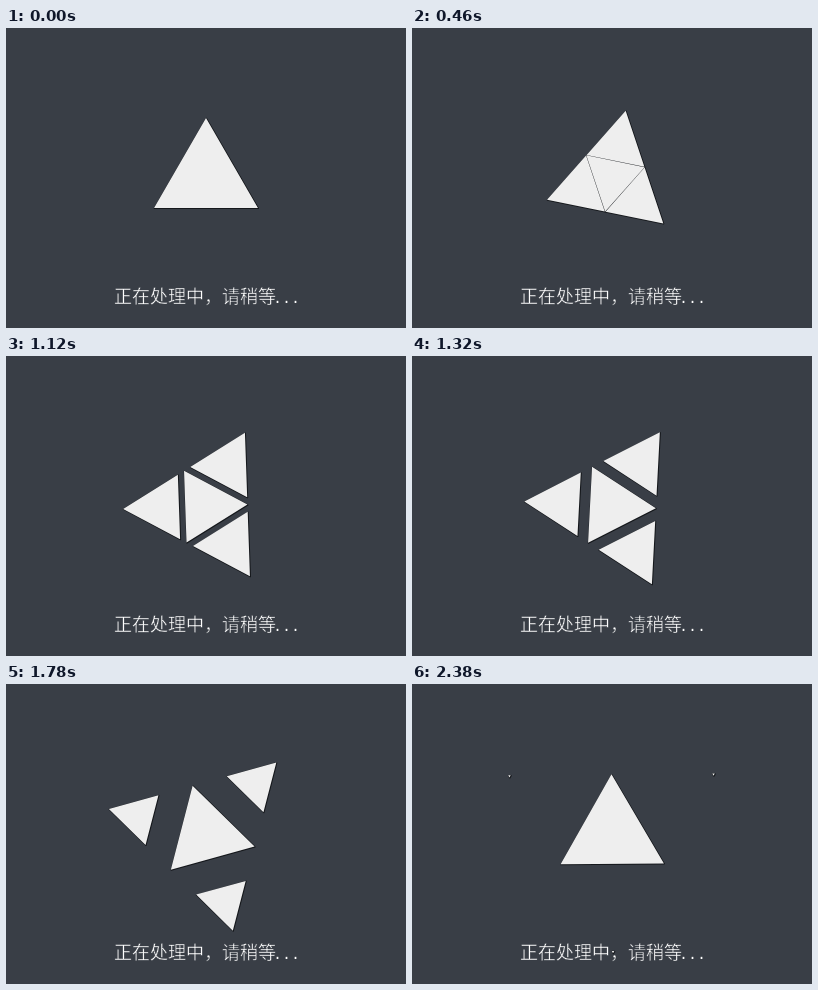
Write an HTML page that moves like this. It is 400 by 300 pixels and loops after 2.4 s.

```html
<!DOCTYPE html>
<html lang="zh-CN">
<head>
<meta charset="utf-8">
<style>
  html, body { margin: 0; width: 100%; height: 100%; overflow: hidden; background: #393e46; }
  svg { display: block; width: 400px; height: 300px; }
  #shape { fill: #eee; }
  #shade { fill: #0d0f12; stroke: #0d0f12; stroke-width: 1.3; stroke-linejoin: round; opacity: .8; }
  text { fill: #fff; stroke: #393e46; stroke-width: .35; font: 18px "Noto Sans CJK SC", "Noto Sans CJK", sans-serif; }
  .dots { stroke: none; font: 15px "Liberation Mono", monospace; }
</style>
</head>
<body>
<svg viewBox="0 0 400 300">
  <path id="shade" transform="translate(.4 .4)"/>
  <path id="shape"/>
  <text x="108" y="275">正在处理中，请稍等<tspan class="dots" x="267">...</tspan></text>
</svg>
<script>
const LOOP = 2400, STEP = 20, CX = 200, CY = 150, R = 30;
const layers = document.querySelectorAll('path');

// Point at distance r from (x, y), angle in degrees clockwise from up
function polar(x, y, r, deg) {
  const a = deg * Math.PI / 180;
  return [x + r * Math.sin(a), y - r * Math.cos(a)];
}

function triangle(x, y, r, deg) {
  const pts = [0, 120, 240].map(d =>
    polar(x, y, r, deg + d).map(v => v.toFixed(3)).join(' '));
  return 'M' + pts.join('L') + 'Z';
}

function draw(ms) {
  const p = Math.floor(ms % LOOP / STEP) * STEP / LOOP;
  const turn = 60 * p;
  const size = R * 2 ** p;
  const fly = p ** 3;
  let d = triangle(CX, CY, size, 180 + turn);
  for (const k of [0, 120, 240]) {
    const [x, y] = polar(CX, CY, size * (1 + fly), k + turn);
    d += triangle(x, y, size * (1 - fly), k + turn);
  }
  layers.forEach(path => path.setAttribute('d', d));
}

const start = performance.now();
function tick() {
  draw(performance.now() - start);
  requestAnimationFrame(tick);
}
tick();
</script>
</body>
</html>
```
